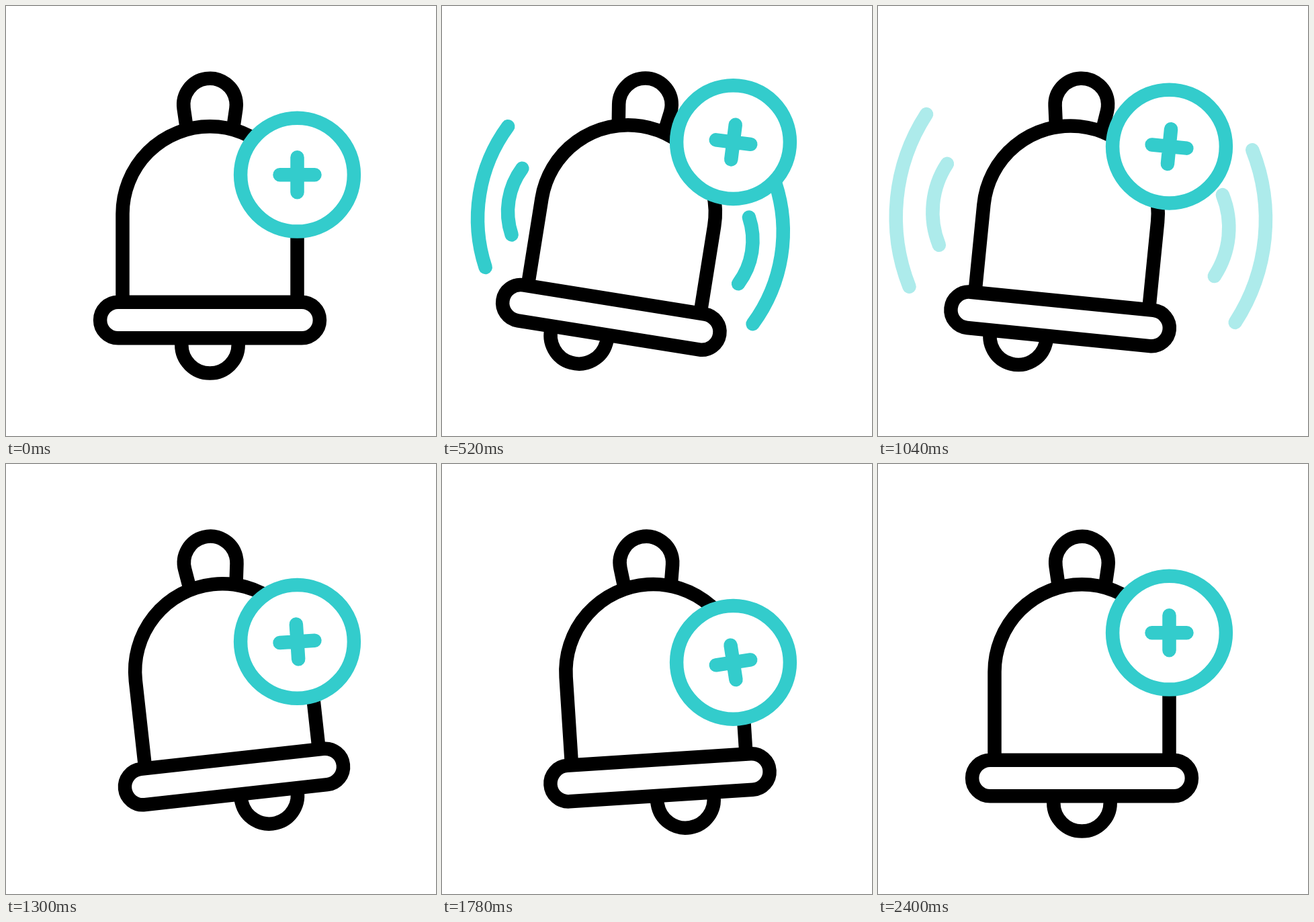
These frames come from a looping animation (640 px wide and 640 px high, 3020 ms). An HTML page with a canvas:

```html
<!DOCTYPE html>
<html lang="en">
<head>
<meta charset="utf-8">
<title>Add notification bell</title>
<style>
  html, body { margin: 0; width: 100%; height: 100%; overflow: hidden; background: #fff; }
  canvas { display: block; }
</style>
</head>
<body>
<canvas id="stage" width="640" height="640"></canvas>
<script>
const ctx = document.getElementById('stage').getContext('2d');
const LOOP = 3020, STEP = 20, LINE = 20.5;
const BLACK = '#000', TEAL = '#33cccc', WHITE = '#fff';
const PIVOT = { x: 303.5, y: 140.5 };

// Keyframes as [time in ms, value]
const BELL = [[0, 0], [400, 16], [800, -16], [1100, 8.2], [1350, -8], [1600, 3.9], [1800, -3.9], [2000, 2], [2200, -2], [2400, 0]];
const CLAPPER = [[0, 0], [400, 12], [800, -12], [1100, 11.9], [1350, -10], [1600, 6.7], [1800, -6], [2000, 2.9], [2200, -2.5], [2400, 0]];
const BADGE_Y = [[0, 0], [800, -67.7], [1600, 50.7], [2400, 0]];
const BADGE_TURN = [[0, 0], [800, 10], [1600, -10], [2400, 0]];
const WAVE_START = 400, WAVE_FADE = 800, WAVE_END = 1200;

// Chord middle at start and end, half chord and bulge at full size
const WAVES = [
  { side: -1, from: [-194.3, 177.2], to: [-232.2, 171.7], half: 131.8, bulge: 32 },
  { side: -1, from: [-164, 179.3], to: [-193.3, 174], half: 62.1, bulge: 15.3 },
  { side: 1, from: [206, 198.6], to: [266, 174.8], half: 131.8, bulge: 32 },
  { side: 1, from: [175.8, 198.9], to: [227.6, 177.8], half: 62.1, bulge: 15.3 }
];

const mix = (a, b, u) => a + (b - a) * u;
const ease = u => u * u * (3 - 2 * u);
const radians = degrees => degrees * Math.PI / 180;

function valueAt(keys, t) {
  const i = keys.findIndex(key => key[0] > t);
  if (i < 0) return keys[keys.length - 1][1];
  const [t0, v0] = keys[i - 1], [t1, v1] = keys[i];
  return mix(v0, v1, ease((t - t0) / (t1 - t0)));
}

function shape(color, trace, filled) {
  ctx.beginPath();
  trace();
  if (filled) {
    ctx.fillStyle = WHITE;
    ctx.fill();
  }
  ctx.strokeStyle = color;
  ctx.stroke();
}

function drawClapper(turn) {
  ctx.save();
  ctx.rotate(radians(turn));
  shape(BLACK, () => {
    ctx.moveTo(42.2, 350);
    ctx.lineTo(42.2, 363.8);
    ctx.arc(0, 363.8, 42.2, 0, Math.PI);
    ctx.lineTo(-42.2, 350);
  });
  ctx.restore();
}

function drawBell() {
  const lean = radians(8.3);
  shape(BLACK, () => {
    ctx.moveTo(-34.3, 43.9);
    ctx.arc(0, 6.5, 39.3, Math.PI - lean, lean);
    ctx.lineTo(34.3, 43.9);
  });
  shape(BLACK, () => {
    ctx.moveTo(-130, 300);
    ctx.lineTo(-130, 168.8);
    ctx.arc(0, 168.8, 130, Math.PI, 0);
    ctx.lineTo(130, 300);
  }, true);
  shape(BLACK, () => {
    ctx.arc(-136.6, 327, 26.8, Math.PI / 2, Math.PI * 1.5);
    ctx.arc(136.6, 327, 26.8, -Math.PI / 2, Math.PI / 2);
    ctx.closePath();
  }, true);
}

function drawWaves(t) {
  if (t < WAVE_START || t >= WAVE_END) return;
  const p = ease((t - WAVE_START) / (WAVE_END - WAVE_START));
  const size = mix(0.793, 1, p);
  ctx.globalAlpha = Math.min(1, (WAVE_END - t) / (WAVE_END - WAVE_FADE));
  ctx.lineCap = 'round';
  for (const { side, from, to, half, bulge } of WAVES) {
    const radius = (half * half + bulge * bulge) / (2 * bulge);
    const spread = Math.asin(half / radius);
    const x = mix(from[0], to[0], p) + side * size * (bulge - radius);
    const middle = side > 0 ? 0 : Math.PI;
    shape(TEAL, () => ctx.arc(x, mix(from[1], to[1], p), radius * size, middle - spread, middle + spread));
  }
}

function drawBadge(t) {
  ctx.save();
  ctx.translate(433.5, 251.2 + valueAt(BADGE_Y, t));
  shape(TEAL, () => ctx.arc(0, 0, 84.4, 0, Math.PI * 2), true);
  ctx.rotate(radians(valueAt(BADGE_TURN, t)));
  ctx.lineCap = 'round';
  shape(TEAL, () => {
    ctx.moveTo(-26, 0);
    ctx.lineTo(26, 0);
    ctx.moveTo(0, -26);
    ctx.lineTo(0, 26);
  });
  ctx.restore();
}

function draw(t) {
  ctx.fillStyle = WHITE;
  ctx.fillRect(0, 0, 640, 640);
  ctx.lineWidth = LINE;
  ctx.save();
  ctx.translate(PIVOT.x, PIVOT.y);
  ctx.rotate(radians(valueAt(BELL, t)));
  drawClapper(valueAt(CLAPPER, t));
  drawBell();
  drawWaves(t);
  ctx.restore();
  drawBadge(t);
}

let start;
function tick(now) {
  start ??= now;
  const t = Math.max(0, now - start) % LOOP;
  draw(Math.floor(t / STEP) * STEP);
  requestAnimationFrame(tick);
}
draw(0);
requestAnimationFrame(tick);
</script>
</body>
</html>
```
